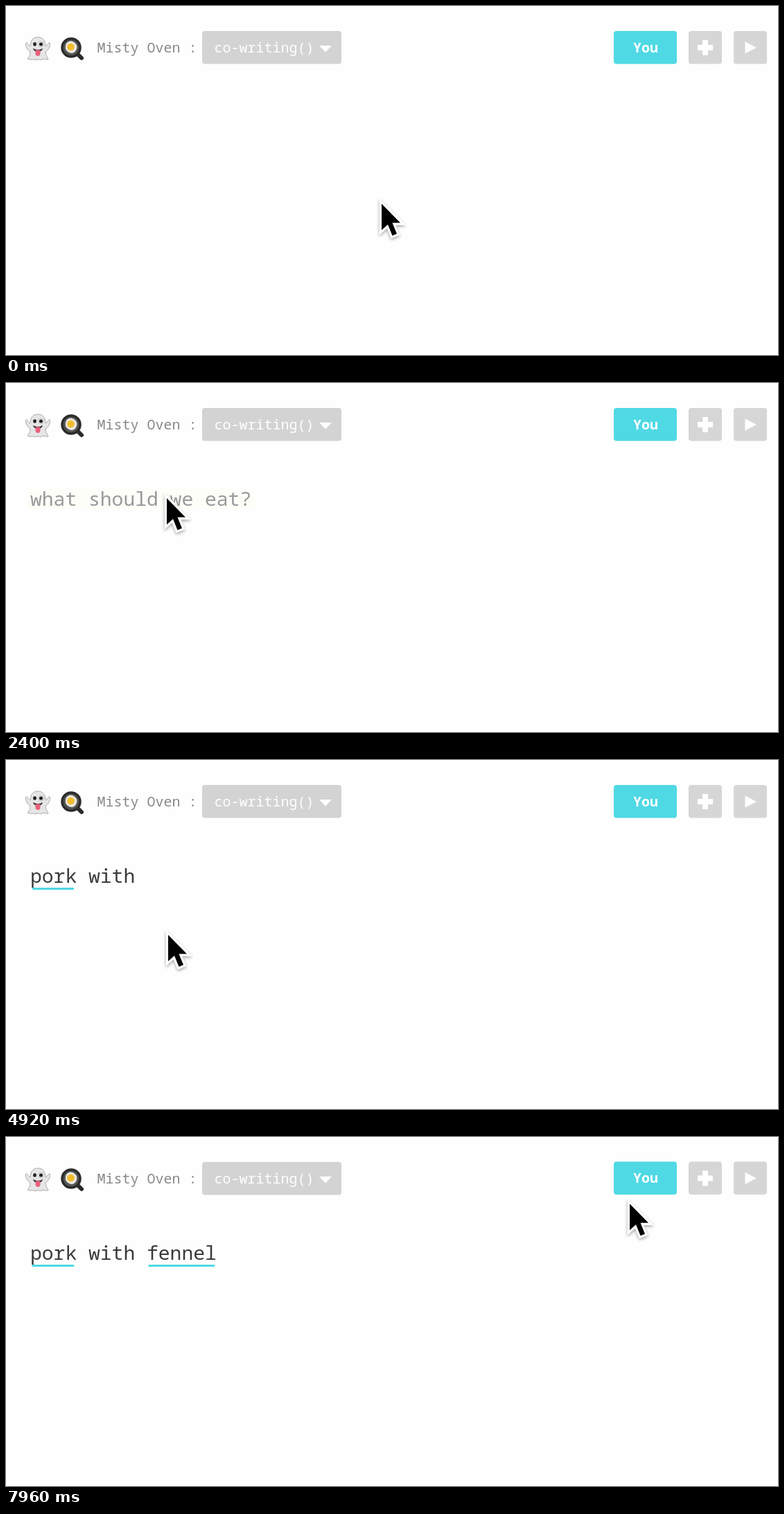
An HTML page that plays this animation: 1114x503 px, repeating every 8000 ms.

```html
<!DOCTYPE html>
<html lang="en">
<head>
<meta charset="utf-8">
<title>Co-writing demo</title>
<style>
html, body { margin: 0; width: 100%; height: 100%; overflow: hidden; background: #fefefe; }
svg { display: block; }
text { font: 500 20px "Roboto Mono", "Noto Sans Mono", "DejaVu Sans Mono", monospace; fill: #fff; }
.line { font-size: 28px; font-weight: 400; }
.cursor { filter: drop-shadow(0 2px 2px rgba(0, 0, 0, .35)); }
</style>
</head>
<body>
<svg width="1114" height="503" viewBox="0 0 1114 503">
  <!-- ghost -->
  <g transform="translate(46 61)">
    <path d="M0-16C8-16 11-10 11-3C14-4 15-9 17-8C19-4 15 3 11 5C11 10 14 13 15 16C11 17 9 14 6 16C3 18 2 15-1 16C-4 18-6 15-9 16C-12 17-14 15-15 15C-12 12-11 9-11 5C-15 3-19-4-17-8C-15-9-14-4-11-3C-11-10-8-16 0-16Z" fill="#e6e6e6" stroke="#aaa"/>
    <ellipse cx="-4.5" cy="-6" rx="2.4" ry="2.8" fill="#222"/>
    <circle cx="4.5" cy="-6" r="4" fill="#fff" stroke="#999" stroke-width=".6"/>
    <circle cx="4.5" cy="-6" r="2.6" fill="#222"/>
    <path d="M-7 0Q0 4 7 0Q6 5 0 5T-7 0" fill="#333"/>
    <path d="M-3.5 2.5H3.5V7A3.5 4 0 0 1-3.5 7Z" fill="#e8617c"/>
  </g>
  <!-- frying pan -->
  <path d="M103 69L109 75" stroke="#2b2b2b" stroke-width="6" stroke-linecap="round"/>
  <circle cx="94" cy="60" r="13" fill="#555" stroke="#2b2b2b" stroke-width="3.5"/>
  <path d="M87 54Q92 48 98 52Q105 57 101 64Q97 70 91 67Q83 63 87 54Z" fill="#e9e7df"/>
  <circle cx="93.500" cy="59" r="5.300" fill="#f2bd2c"/>

  <text x="131.500" y="67" style="fill:#888">Misty Oven :</text>
  <rect x="283" y="36" width="201" height="47.500" rx="4" fill="#d3d3d3"/>
  <text x="300.500" y="67">co-writing()</text>
  <path d="M452 57H470L461 66.500Z" fill="#fff"/>

  <g id="buttons">
    <rect x="877" y="36" width="91" height="47.500" rx="4" fill="#4fd9e4"/>
    <text x="905" y="67" style="font-weight:700">You</text>
    <rect x="985" y="36" width="48" height="47.500" rx="4" fill="#d6d6d6"/>
    <path d="M1009 49V71M998 60H1020" stroke="#fff" stroke-width="8"/>
    <rect x="1050" y="36" width="48" height="47.500" rx="4" fill="#d6d6d6"/>
    <path d="M1066.500 51.500V68.500L1083 60Z" fill="#fff"/>
  </g>

  <rect id="mark" x="30" y="153" width="328" height="29" fill="#f7ffcf"/>
  <text id="ask" class="line" x="35" y="177" style="fill:#999"></text>
  <text id="reply" class="line" x="35" y="177" style="fill:#3a3a3a"></text>
  <g stroke="#4fd9e4" stroke-width="3">
    <path id="line1"/>
    <path id="line2"/>
  </g>

  <path id="cursor" class="cursor" d="M0 0V38L9 30L15.500 46L22 43.300L15.500 27.500H27Z"
    stroke="#fff" stroke-width="6.500" paint-order="stroke"/>
</svg>
<script>
const $ = id => document.getElementById(id);
const ramp = (t, a, b) => Math.min(1, Math.max(0, (t - a) / (b - a)));
const typed = (text, t, start, step) => text.slice(0, Math.max(0, Math.floor((t - start) / step) + 1));

// time, x, y of the pointer tip
const route = [
  [0, 542, 285], [1640, 542, 285], [2360, 232, 166], [2960, 232, 166],
  [3200, 202, 215], [3440, 234, 252], [6800, 234, 252], [8000, 923, 91]
];

function pointer(t) {
  const i = route.findIndex(p => p[0] > t);
  const [t0, x0, y0] = route[i - 1], [t1, x1, y1] = route[i];
  const k = ramp(t, t0, t1);
  return [x0 + (x1 - x0) * k, y0 + (y1 - y0) * k];
}

// A line that grows from its centre and settles
function underline(id, t, start, centre, width, tau) {
  const age = Math.max(0, t - start);
  const half = width / 2 * (1 - Math.exp(-age / tau));
  $(id).setAttribute("d", half ? `M${centre - half} 185.500H${centre + half}` : "");
}

function draw(now) {
  const t = Math.floor((now % 8000 + 1) / 40) * 40 % 8000;
  $("ask").textContent = typed("what should we eat?", t, 630, 76);
  $("ask").style.opacity = 1 - ramp(t, 2400, 2840);
  $("mark").style.opacity = ramp(t, 2360, 2640) * (1 - ramp(t, 2960, 3200));
  $("reply").textContent = typed("pork with fennel", t, 3866, 130);
  underline("line1", t, 4480, 68, 60.5, 95);
  underline("line2", t, 6240, 253.3, 95.5, 205);
  $("buttons").setAttribute("transform", `translate(0 ${t < 7120 ? 0 : -.6})`);
  $("cursor").setAttribute("transform", `translate(${pointer(t)})`);
  requestAnimationFrame(draw);
}
requestAnimationFrame(draw);
</script>
</body>
</html>
```
